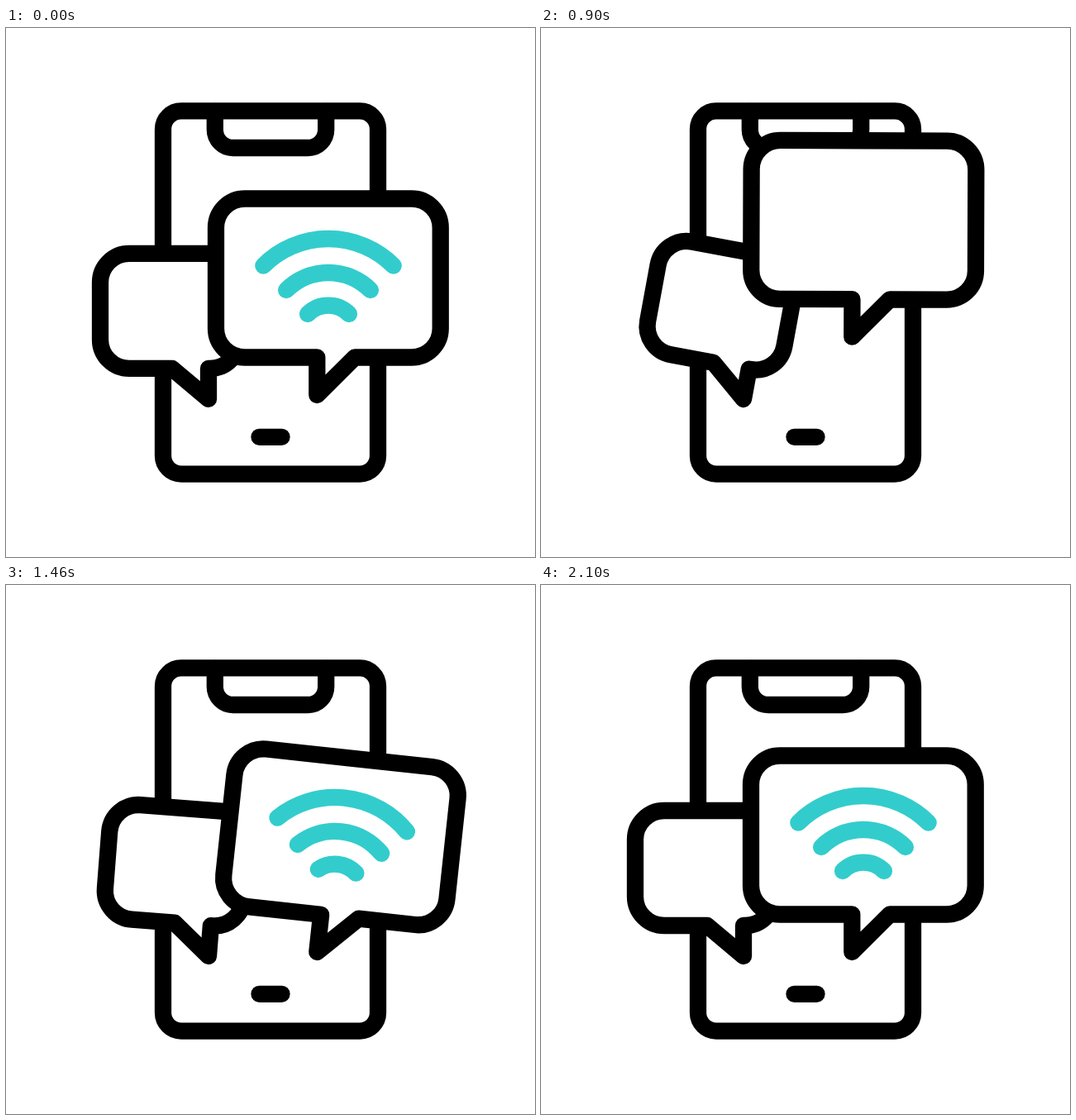
Animation, 640 px wide and 640 px high, one loop 2400 ms. Source, as an HTML page with a canvas:

```html
<!DOCTYPE html>
<html lang="en">
<head>
<meta charset="utf-8">
<title>Phone chat</title>
<style>
  html, body { margin: 0; width: 100%; height: 100%; overflow: hidden; background: #fff; }
  canvas { display: block; width: 100vmin; height: 100vmin; }
</style>
</head>
<body>
<canvas id="stage" width="640" height="640"></canvas>
<script>
const LOOP = 2400;
const INK = '#000', TEAL = '#33cccc';
const ctx = document.getElementById('stage').getContext('2d');

const smooth = p => p * p * (3 - 2 * p);
const soft = p => (p + smooth(p)) / 2;

// Keys are [time, value, ease into this key]
function track(keys, t) {
  if (t <= keys[0][0]) return keys[0][1];
  for (let i = 1; i < keys.length; i++) {
    const [t0, v0] = keys[i - 1], [t1, v1, ease = soft] = keys[i];
    if (t < t1) return v0 + (v1 - v0) * ease((t - t0) / (t1 - t0));
  }
  return keys[keys.length - 1][1];
}

const SWING = [[375, 0], [790, 16, smooth], [1215, -10], [1400, 6], [1600, 0]];
const LAG = 500;

const left = {
  x: 114, y: 273, r: 282, b: 412, tip: [245, 449], tail: [245, 201],
  hop: [[0, 0], [420, -70], [610, 0]], delay: 0
};
const right = {
  x: 254, y: 206.5, r: 525.7, b: 398.5, tip: [376.3, 444], tail: [422, 376.3],
  hop: [[360, 0], [900, -70.5], [1090, 0]], delay: LAG
};

// Wi-Fi arcs: centre y, radius, time the arc starts to shrink, time it starts to grow
const WAVES = [
  [366.3, 111.3, 0, 1100],
  [368, 72, 100, 1200],
  [371, 35.3, 200, 1300]
];

function ink(color) {
  ctx.strokeStyle = color;
  ctx.lineWidth = 20.3;
  ctx.lineCap = ctx.lineJoin = 'round';
  ctx.stroke();
}

function phone() {
  ctx.beginPath();
  ctx.roundRect(190, 100.4, 260, 439.2, 22);
  ink(INK);
  ctx.beginPath();
  ctx.moveTo(252.8, 101);
  ctx.arcTo(252.8, 145, 320, 145, 22);
  ctx.arcTo(387.2, 145, 387.2, 101, 22);
  ctx.lineTo(387.2, 101);
  ink(INK);
  ctx.beginPath();
  ctx.moveTo(306.5, 494.8);
  ctx.lineTo(333.5, 494.8);
  ink(INK);
}

function bubble(s, t, content) {
  const [px, py] = s.tip, mid = (s.x + s.r) / 2;
  ctx.save();
  ctx.translate(px, py + track(s.hop, t));
  ctx.rotate(track(SWING, t - s.delay) * Math.PI / 180);
  ctx.translate(-px, -py);
  ctx.beginPath();
  ctx.moveTo(mid, s.y);
  ctx.arcTo(s.r, s.y, s.r, s.b, 35);
  ctx.arcTo(s.r, s.b, mid, s.b, 35);
  ctx.lineTo(s.tail[0], s.b);
  ctx.lineTo(px, py);
  ctx.lineTo(s.tail[1], s.b);
  ctx.arcTo(s.x, s.b, s.x, s.y, 35);
  ctx.arcTo(s.x, s.y, mid, s.y, 35);
  ctx.closePath();
  ctx.fillStyle = '#fff';
  ctx.fill();
  ink(INK);
  if (content) content(t);
  ctx.restore();
}

function wifi(t) {
  for (const [y, r, out, back] of WAVES) {
    const open = track([[out, 1], [out + 200, 0, smooth], [back, 0], [back + 200, 1, smooth]], t);
    if (open < 0.001) continue;
    const half = open * Math.PI / 4;
    ctx.beginPath();
    ctx.arc(390, y, r, -Math.PI / 2 - half, -Math.PI / 2 + half);
    ink(TEAL);
  }
}

function draw(t) {
  ctx.fillStyle = '#fff';
  ctx.fillRect(0, 0, 640, 640);
  phone();
  bubble(left, t);
  bubble(right, t, wifi);
}

const start = performance.now();
function frame() {
  draw((performance.now() - start) % LOOP);
  requestAnimationFrame(frame);
}
frame();
</script>
</body>
</html>
```
